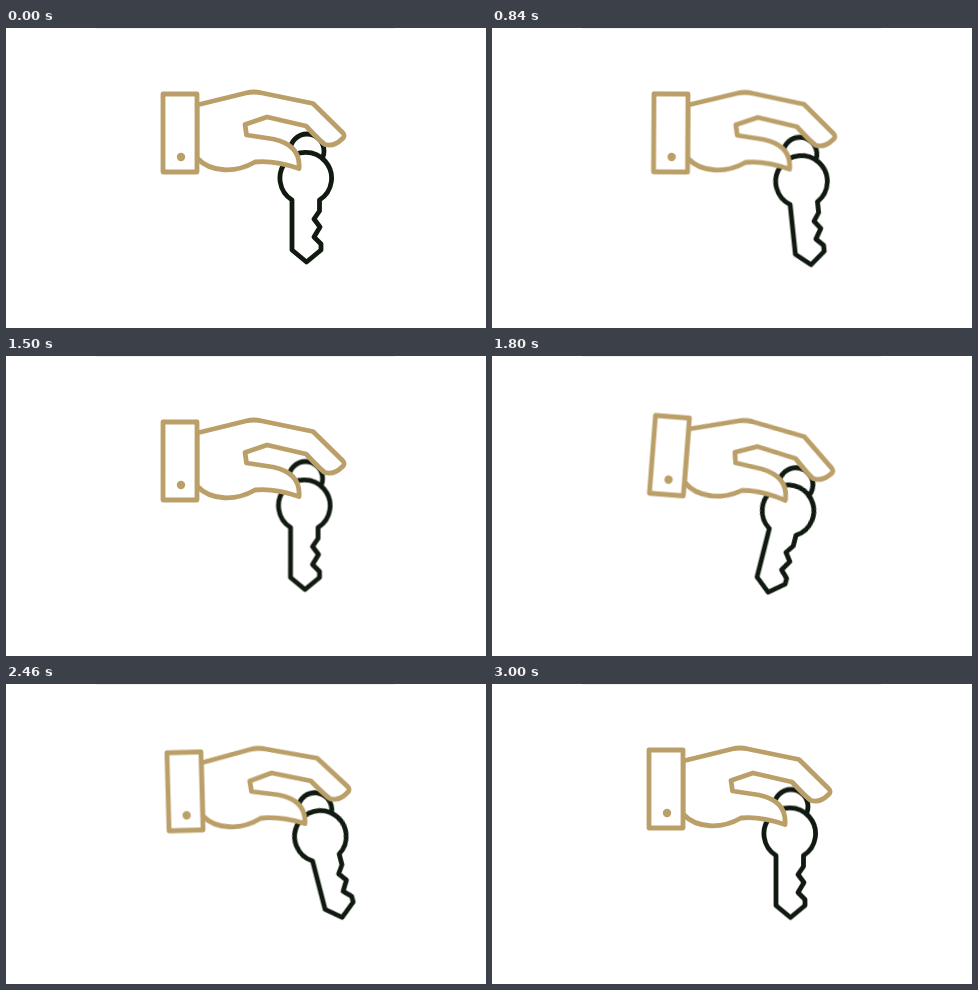
An HTML page for the animation above (3030 ms loop, 480 by 300 pixels).

```html
<!DOCTYPE html>
<html lang="en">
<head>
<meta charset="utf-8">
<title>Hand with key</title>
<style>
  html, body { margin: 0; width: 100%; height: 100%; overflow: hidden; background: #fff; }
  svg { display: block; width: 480px; height: 300px; }
  path, rect, circle { fill: #fff; stroke-linejoin: round; stroke-linecap: round; }
  .hand, .key { animation: 3030ms cubic-bezier(.37, 0, .63, 1) infinite; }
  .hand { stroke: #bb9f68; stroke-width: 4.8; transform-origin: 248px 105px; animation-name: hand; }
  .key { stroke: #101a10; stroke-width: 4.8; animation-name: key; }
  .button { fill: #bb9f68; stroke: none; }
  .edge { fill: #eee; }

  /* Two swings per loop: left, right, rest */
  @keyframes hand {
    0%, 46.5%, 49%, 95.5%, 100% { transform: translate(0px, 0px) rotate(0deg); }
    15.5%, 64.5% { transform: translate(4.2px, .6px) rotate(5.9deg); }
    34.65%, 83.7% { transform: translate(5px, .3px) rotate(-1.9deg); }
  }
  @keyframes key {
    0% { transform: translate(300px, 150px) rotate(0deg); }
    15.5%, 64.5% { transform: translate(295.6px, 156.3px) rotate(18.7deg); }
    34.65%, 83.7% { transform: translate(315.4px, 152px) rotate(-15.9deg); }
    46.5%, 49% { transform: translate(298.6px, 149.5px) rotate(0deg); }
    95.5%, 100% { transform: translate(298px, 149.5px) rotate(0deg); }
  }
</style>
</head>
<body>
<svg viewBox="0 0 480 300">
  <rect class="edge" x="90" y="0" width="299" height="1"/>
  <g class="key">
    <circle cx="1" cy="-27" r="17"/>
    <path d="M13.5 22V33L8 41L14 49L8 59L15 66V72L.5 84L-14 72V22A25.8 25.8 0 1 1 13.5 22Z"/>
  </g>
  <g class="hand">
    <path d="M191 77L240 65Q248 63 256 65L307 75.5L336.5 104.5Q340 108 336 111Q328 119 319 116.5Q315 114 300 98
      L261 89L239 96.5L240.5 107L267 111Q295 117 293 140.5Q268 132 249 134C230 145 205 145 191 130Z"/>
    <rect x="157" y="66" width="34" height="78"/>
    <circle class="button" cx="175" cy="129" r="4.2"/>
  </g>
</svg>
</body>
</html>
```
